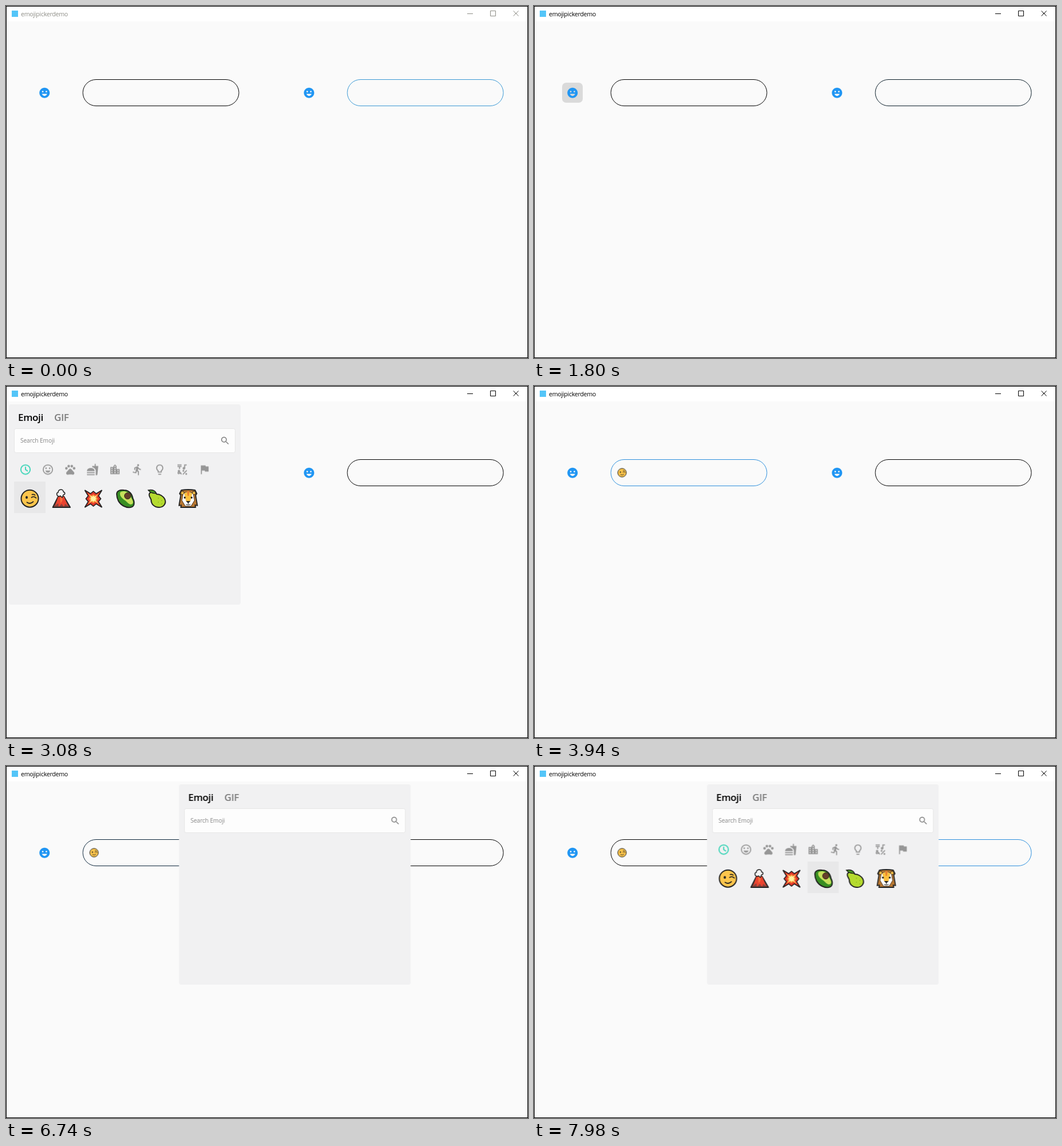
Recreate the animation shown at these times as an HTML page. Size 910 px wide and 615 px high, loop 8000 ms.

```html
<!DOCTYPE html>
<html lang="en">
<head>
<meta charset="utf-8">
<title>emojipickerdemo</title>
<style>
html, body { margin: 0; width: 100%; height: 100%; overflow: hidden; background: #fafafa; }
svg { display: block; width: 910px; height: 615px; }
text { font-family: "Open Sans", "Noto Sans", sans-serif; }
.field { fill: none; stroke: #000; }
.btn { fill: #dadada; }
.cell { fill: #e8e8e9; }
.caret { fill: #2196f3; }

/* one shared 8 s clock: 1% = 80 ms */
.cut, .fade { animation-duration: 8s; animation-iteration-count: infinite; }
.cut { animation-timing-function: step-end; }
.fade { animation-timing-function: linear; }

#bar { animation-name: activate; }
@keyframes activate { 0% { color: #8d8d86; } 20.5%, 100% { color: #000; } }

#fieldL { animation-name: edgeL; }
@keyframes edgeL {
  0%, 49.24% { stroke: #000; }
  49.25%, 82.25% { stroke: #2e8fdc; }
  85%, 100% { stroke: #000; }
}
#fieldR { animation-name: edgeR; }
@keyframes edgeR {
  0%, 20.5% { stroke: #3a98d4; }
  23%, 88% { stroke: #000; }
  91%, 100% { stroke: #2e8fdc; }
}

#caretR { animation-name: caretR; }
@keyframes caretR { 0%, 3.75% { opacity: 0; } 5.5%, 20.5% { opacity: 1; } 22%, 100% { opacity: 0; } }
#caretL { animation-name: caretL; }
@keyframes caretL { 0%, 57.75% { opacity: 0; } 59.25%, 75% { opacity: 1; } 77.25%, 100% { opacity: 0; } }

#btnL { animation-name: btnL; }
@keyframes btnL { 0%, 15.75% { opacity: 0; } 17%, 23% { opacity: 1; } 24.5%, 100% { opacity: 0; } }
#btnR { animation-name: btnR; }
@keyframes btnR { 0% { opacity: 0; } 73.75%, 100% { opacity: 1; } }

#picked { animation-name: picked; }
@keyframes picked { 0% { opacity: 0; } 49.25%, 100% { opacity: 1; } }

#panelL { animation-name: panelL; }
@keyframes panelL { 0% { opacity: 0; } 23% { opacity: 1; } 49.25%, 100% { opacity: 0; } }
#listL { animation-name: listL; }
@keyframes listL { 0% { opacity: 0; } 24.5%, 100% { opacity: 1; } }
#panelR { animation-name: panelR; }
@keyframes panelR { 0% { opacity: 0; } 83.75%, 100% { opacity: 1; } }
#listR { animation-name: listR; }
@keyframes listR { 0% { opacity: 0; } 85.5%, 100% { opacity: 1; } }

#onFaces { animation-name: onFaces; }
@keyframes onFaces { 0%, 26.25% { opacity: 1; } 27.25%, 100% { opacity: 0; } }
#onVolcano { animation-name: onVolcano; }
@keyframes onVolcano { 0%, 27.5% { opacity: 0; } 28.5%, 35.5% { opacity: 1; } 37%, 100% { opacity: 0; } }
#onWink { animation-name: onWink; }
@keyframes onWink { 0%, 36.5% { opacity: 0; } 38%, 100% { opacity: 1; } }
#onAvocado { animation-name: onAvocado; }
@keyframes onAvocado { 0% { opacity: 0; } 99.75%, 100% { opacity: 1; } }
</style>
</head>
<body>
<svg viewBox="0 0 910 615" xmlns="http://www.w3.org/2000/svg">
<defs>
  <path id="smile" fill="#2196f3" transform="scale(.9) translate(-12 -12)" d="M11.99 2C6.47 2 2 6.48 2 12c0 5.52 4.47 10 9.99 10C17.52 22 22 17.52 22 12 22 6.48 17.52 2 11.99 2zM8.5 8c.83 0 1.5.67 1.5 1.5S9.33 11 8.5 11 7 10.33 7 9.5 7.67 8 8.5 8zM12 18c-2.28 0-4.22-1.66-5-4h10c-.78 2.34-2.72 4-5 4zm3.5-7c-.83 0-1.5-.67-1.5-1.5S14.67 8 15.5 8s1.5.67 1.5 1.5-.67 1.5-1.5 1.5z"/>

  <g id="wink">
    <circle r="15" fill="#fcc54c" stroke="#222" stroke-width="2"/>
    <ellipse cx="-5.5" cy="-2" rx="2" ry="2.4" fill="#222"/>
    <path d="M3-2q4-3 8 1M4-7q3-1 5 1M-5 6.5q6 4 11-1" fill="none" stroke="#222" stroke-width="1.8" stroke-linecap="round"/>
  </g>

  <g id="volcano" stroke-linejoin="round">
    <path d="M-6-4H4L15 15H-15.5z" fill="#85413a" stroke="#222" stroke-width="1.8"/>
    <path d="M-6-4H4L11 13 6 9 4 14 0 9-5 14-6 8-11 12z" fill="#ea4430"/>
    <path d="M-3-3H2L1 4-2 8z" fill="#f9713c"/>
    <path d="M-5-4C-10-6-9-11-6-11-6-17 3-18 3-12 7-11 6-7 3-7L1-2-2-5z" fill="#f4f4f4" stroke="#222" stroke-width="1.5"/>
  </g>

  <path id="star" d="M-15-15-5-9 0-13 5-9 15-15 9-5 13 0 9 5 15 15 5 9 0 13-5 9-15 15-9 5-13 0-9-5z"/>
  <g id="burst">
    <use href="#star" fill="#e4382b" stroke="#222" stroke-width="1.6"/>
    <use href="#star" fill="#f7923a" transform="scale(.62)"/>
    <use href="#star" fill="#fff2a0" transform="scale(.4)"/>
  </g>

  <g id="avocado">
    <path d="M-15-8C-15-14-9-16-2-15 7-15 12-8 13-1 17 7 16 14 9 15 0 16-8 11-12 4-14 0-15-4-15-8z" fill="#388e22" stroke="#222" stroke-width="2"/>
    <path d="M-9-11C-5-15 6-13 9-6 10 0 15 4 13 8 9 13 4 7 1 4-3 1-11-4-9-11z" fill="#c6e05c"/>
    <circle cx="4" cy="-5" r="5.5" fill="#65402a" stroke="#3b2418"/>
  </g>

  <g id="pear">
    <path d="M-13-9C-10-14-4-12 0-8 5-8 11-5 14 1 17 9 11 15 4 15-5 15-10 9-10 2-11-2-15-5-13-9z" fill="#b5db2f" stroke="#222" stroke-width="2"/>
    <path d="M-15-15Q-5-17-1-10-9-8-15-15z" fill="#4b9d25" stroke="#222" stroke-width="1.5"/>
    <path d="M2-1h1M8 3h1M2 6h1M8 9h1" stroke="#7c9e1c" stroke-width="1.5"/>
  </g>

  <g id="lion">
    <path d="M-12-15Q0-17 12-15L15-9 13-6 16 12 12 11 13 15H-13L-12 11-16 12-13-6-15-9z" fill="#b97832" stroke="#222" stroke-width="1.8" stroke-linejoin="round"/>
    <circle cx="-10" cy="-10" r="3" fill="#f6bd45" stroke="#222"/>
    <circle cx="10" cy="-10" r="3" fill="#f6bd45" stroke="#222"/>
    <path d="M-9-8Q0-17 9-8L11 3 5 13H-5L-11 3z" fill="#fff" stroke="#4a321c"/>
    <path d="M-7-9Q0-15 7-9L4 4H-4z" fill="#fbc03f"/>
    <path d="M-2-13H2L1-5H-1z" fill="#e87e2d"/>
    <path d="M-4 4H4L0 8z" fill="#222"/>
    <path d="M0 7V10M-4 10Q0 12 4 10" fill="none" stroke="#222"/>
    <circle cx="-6" cy="-2" r="1.7" fill="#222"/>
    <circle cx="6" cy="-2" r="1.7" fill="#222"/>
  </g>

  <g id="head">
    <rect x="5" y="32" width="404" height="350" rx="4" fill="#f1f1f2"/>
    <g font-weight="600" font-size="17" letter-spacing="-.35">
      <text x="21" y="61">Emoji</text>
      <text x="84" y="61" fill="#7b7b7b">GIF</text>
    </g>
    <rect x="14.5" y="74.5" width="385" height="42" rx="3" fill="#fdfdfd" stroke="#e6e6e6"/>
    <text x="25" y="99" font-size="10.2" letter-spacing="-.1" fill="#858585">Search Emoji</text>
    <path fill="#828282" transform="translate(372.8 86.5) scale(.76)" d="M15.5 14h-.79l-.28-.27C15.41 12.59 16 11.11 16 9.5 16 5.91 13.09 3 9.5 3S3 5.91 3 9.5 5.91 16 9.5 16c1.61 0 3.09-.59 4.23-1.57l.27.28v.79l5 4.99L20.49 19l-4.99-5zm-6 0C7.01 14 5 11.99 5 9.5S7.01 5 9.5 5 14 7.01 14 9.5 11.99 14 9.5 14z"/>
  </g>

  <g id="list">
    <g fill="#969696" transform="translate(34 146) scale(.9) translate(-12 -12)">
      <g fill="none" stroke="#31d3b4" stroke-width="2">
        <circle cx="12" cy="12" r="9"/>
        <path d="M12 6.5V12l4.5 3"/>
      </g>
      <g transform="translate(43.33)">
        <circle cx="12" cy="12" r="9" fill="none" stroke="#969696" stroke-width="2"/>
        <circle cx="8.5" cy="9.5" r="1.5"/>
        <circle cx="15.5" cy="9.5" r="1.5"/>
        <path d="M7 14h10q-1.5 4-5 4t-5-4z"/>
      </g>
      <g transform="translate(86.67)">
        <circle cx="4.5" cy="9.5" r="2.5"/>
        <circle cx="9" cy="5.5" r="2.5"/>
        <circle cx="15" cy="5.5" r="2.5"/>
        <circle cx="19.5" cy="9.5" r="2.5"/>
        <path d="M17.34 14.86l-2.48-2.91Q12 9 9.14 11.95l-2.48 2.91c-1.31 1.31-2.92 2.76-2.62 4.79.29 1.02 1.02 2.03 2.33 2.32.73.15 3.06-.44 5.63-.44s4.9.58 5.63.44c1.31-.29 2.04-1.31 2.33-2.32.31-2.04-1.31-3.48-2.62-4.79z"/>
      </g>
      <path transform="translate(130)" d="M18.06 22.99h1.66c.84 0 1.53-.64 1.63-1.46L23 5.05h-5V1h-1.97v4.05h-4.97l.3 2.34c1.71.47 3.31 1.32 4.27 2.26 1.44 1.42 2.43 2.89 2.43 5.29zM1 21.99V21h15.03v.99q0 1-1 1h-13q-1.03 0-1.03-1zm15.03-7c0-8-15.03-8-15.03 0zM1 17h15v2H1z"/>
      <path transform="translate(173.33)" d="M15 11V5l-3-3-3 3v2H3v14h18V11h-6zm-8 8H5v-2h2v2zm0-4H5v-2h2v2zm0-4H5V9h2v2zm6 8h-2v-2h2v2zm0-4h-2v-2h2v2zm0-4h-2V9h2v2zm0-4h-2V5h2v2zm6 12h-2v-2h2v2zm0-4h-2v-2h2v2z"/>
      <path transform="translate(216.67)" d="M13.49 5.48c1.1 0 2-.9 2-2s-.9-2-2-2-2 .9-2 2 .9 2 2 2zm-3.6 13.9l1-4.4 2.1 2v6h2v-7.5l-2.1-2 .6-3c1.3 1.5 3.3 2.5 5.5 2.5v-2c-1.9 0-3.5-1-4.3-2.4l-1-1.6c-.4-.6-1-1-1.7-1-.3 0-.5.1-.8.1l-5.2 2.2v4.7h2v-3.4l1.8-.7-1.6 8.1-4.9-1-.4 2 7 1.4z"/>
      <path transform="translate(260)" d="M9 21c0 .55.45 1 1 1h4c.55 0 1-.45 1-1v-1H9v1zm3-19C8.14 2 5 5.14 5 9c0 2.38 1.19 4.47 3 5.74V17c0 .55.45 1 1 1h6c.55 0 1-.45 1-1v-2.26c1.81-1.27 3-3.36 3-5.74 0-3.86-3.14-7-7-7zm2.85 11.1l-.85.6V16h-4v-2.3l-.85-.6C7.8 12.16 7 10.63 7 9c0-2.76 2.24-5 5-5s5 2.24 5 5c0 1.63-.8 3.16-2.15 4.1z"/>
      <g transform="translate(303.33)" fill="none" stroke="#969696" stroke-width="2">
        <path d="M3 3h8M3 6h8M7 6v5M17 10V3h4M13.5 21.5l7.5-8M11 21l-6.5-6q1-3 3 0L4 18q0 4 6-.5"/>
        <circle cx="15.5" cy="9.5" r="1.5"/>
        <circle cx="14.5" cy="14.5" r=".8"/>
        <circle cx="20" cy="20.5" r=".8"/>
      </g>
      <path transform="translate(346.67)" d="M14.4 6L14 4H5v17h2v-7h5.6l.4 2h7V6z"/>
    </g>
    <use href="#wink" x="41.5" y="196.7"/>
    <use href="#volcano" x="97" y="197"/>
    <use href="#burst" x="152.3" y="197"/>
    <use href="#avocado" x="208" y="197"/>
    <use href="#pear" x="263" y="197"/>
    <use href="#lion" x="317.6" y="197"/>
  </g>
</defs>

<rect width="910" height="615" fill="#fafafa"/>
<rect width="910" height="27" fill="#fff"/>
<rect x="10" y="8" width="11" height="11" fill="#54c5f8"/>
<g id="bar" class="cut">
  <text x="26" y="17.5" font-size="10.6" letter-spacing="-.26" fill="currentColor">emojipickerdemo</text>
  <path d="M804 13.5h10M844.5 8.5h9v9h-9zM884.5 8.5l9 9M893.5 8.5l-9 9" fill="none" stroke="currentColor"/>
</g>

<rect id="btnL" class="btn fade" x="49" y="134" width="36" height="35" rx="7"/>
<rect id="btnR" class="btn cut" x="510" y="134" width="36" height="35" rx="7"/>
<use href="#smile" x="67.2" y="151.8"/>
<use href="#smile" x="528.3" y="151.8"/>
<rect id="fieldL" class="field fade" x="134" y="128.5" width="272" height="46" rx="23"/>
<rect id="fieldR" class="field fade" x="595" y="128.5" width="272" height="46" rx="23"/>
<g id="picked" class="cut"><use href="#wink" transform="translate(153.5 151.5) scale(.5)"/></g>
<rect id="caretL" class="caret fade" x="163" y="142" width="2" height="18"/>
<rect id="caretR" class="caret fade" x="607" y="142" width="2" height="18"/>

<g id="panelL" class="cut">
  <use href="#head"/>
  <g id="listL" class="cut">
    <rect id="onFaces" class="cell fade" x="53" y="126" width="39" height="41"/>
    <rect id="onVolcano" class="cell fade" x="70" y="167" width="55" height="55"/>
    <rect id="onWink" class="cell fade" x="14" y="167" width="55" height="55"/>
    <use href="#list"/>
  </g>
</g>

<g id="panelR" class="cut" transform="translate(296.6 0)">
  <use href="#head"/>
  <g id="listR" class="cut">
    <rect id="onAvocado" class="cell cut" x="180.4" y="167" width="54" height="55"/>
    <use href="#list"/>
  </g>
</g>

<rect x=".5" y=".5" width="909" height="614" fill="none" stroke="#000"/>
</svg>
</body>
</html>
```
